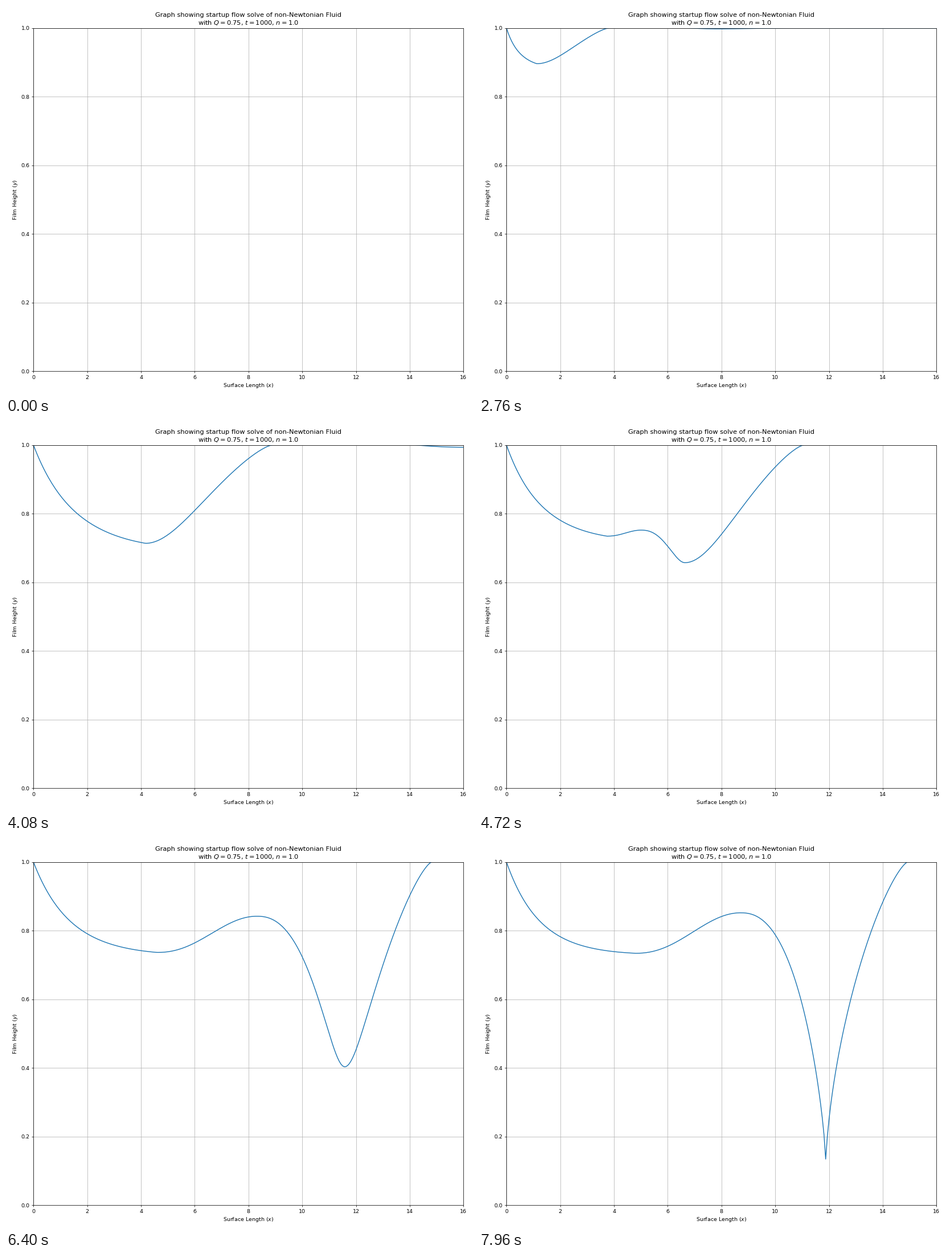
Animation of 820x683 px, one loop 8 s. Source, as a matplotlib script:

```python
import numpy as np
import matplotlib.pyplot as plt
from matplotlib.animation import FuncAnimation

W, H, DPI = 820, 683, 820 / 12
FRAMES, STEP_MS = 200, 40
X = np.linspace(0, 16, 257)

# dip depth over time, once the early power-law growth is over
TIMES = [2760, 3640, 4080, 4480, 5360, 6400, 7000, 7960]
DEPTHS = [.104, .241, .2865, .319, .407, .597, .7275, .866]

# where the features of the film lie at five depths of the dip
DEPTH = [.104, .2865, .407, .597, .866]
DIP = [1.13, 4.17, 9.43, 11.58, 11.875]
CROSSING = [3.8, 8.87, 13.52, 14.81, 14.92]
TROUGH = [1.13, 4.17, 3.25, 4.6, 4.8]
CREST = [1.13, 4.17, 5.95, 8.3, 8.7]
TROUGH_RISE = [0, 0, .165, .3335, .6]
CREST_RISE = [0, 0, .2025, .439, .718]


def dip_depth(ms):
    if ms < TIMES[0]:
        return DEPTHS[0] * (ms / TIMES[0]) ** 3.85
    return np.interp(ms, TIMES, DEPTHS)


def part(a, b):
    """Progress of X from a to b, held within 0 and 1."""
    return np.clip((X - a) / max(b - a, 1e-9), 0, 1)


def cusp(w, power, blunt):
    """Rise from 0 to 1 like w**power, with its foot rounded off."""
    def f(v):
        return (v * v + blunt * blunt) ** (power / 2)
    return (f(w) - f(0)) / (f(1) - f(0))


def film(depth):
    # early growth is self-similar: depth goes with length cubed
    scale = np.cbrt(min(depth / DEPTH[0], 1))
    dip, crossing, trough, crest = (
        scale * np.interp(depth, DEPTH, xs)
        for xs in (DIP, CROSSING, TROUGH, CREST))
    low = 1 - depth
    y_trough = low + np.interp(depth, DEPTH, TROUGH_RISE)
    y_crest = low + np.interp(depth, DEPTH, CREST_RISE)
    sharp = low - .13

    u = part(0, trough)
    wall = y_trough + (1 - y_trough) * np.exp(-(2.5 + 1.75 * depth) * u) * (1 - u ** 4)

    u = part(trough, crest) ** 1.1
    swell = y_trough + (y_crest - y_trough) * (1 - np.cos(np.pi * u)) / 2

    u = part(crest, dip)
    fall = low + (y_crest - low) * cusp(1 - u ** 2.4, .75, 6.5 * sharp ** 2)

    u = part(dip, crossing)
    climb = low + depth * cusp(1 - (1 - u) ** 1.35, .63, sharp)

    # damped ripple ahead of the dip
    v = np.maximum((X - crossing) / (crossing - dip), 0)
    ripple = 1 + .25 * depth * np.sin(np.pi * v / 1.15) * np.exp(-1.46 * v)

    return np.select([X < trough, X < crest, X < dip, X < crossing],
                     [wall, swell, fall, climb], ripple)


# the small margin keeps the pixel size from rounding down
fig = plt.figure(figsize=((W + .01) / DPI, (H + .01) / DPI), dpi=DPI)
ax = fig.add_axes([48.2 / W, 42 / H, 755.2 / W, 602.3 / H])
ax.set(xlim=(0, 16), ylim=(0, 1),
       xlabel="Surface Length ($x$)", ylabel="Film Height ($y$)")
ax.set_title("Graph showing startup flow solve of non-Newtonian Fluid\n"
             "with $Q=0.75$, $t=1000$, $n=1.0$")
ax.grid()
line, = ax.plot([], [])


def draw(i):
    if i == 0:
        line.set_data([], [])
    else:
        line.set_data(X, film(dip_depth(i * STEP_MS)))
    return line,


anim = FuncAnimation(fig, draw, frames=FRAMES, interval=STEP_MS,
                     repeat=True, repeat_delay=0)
plt.show()
```
